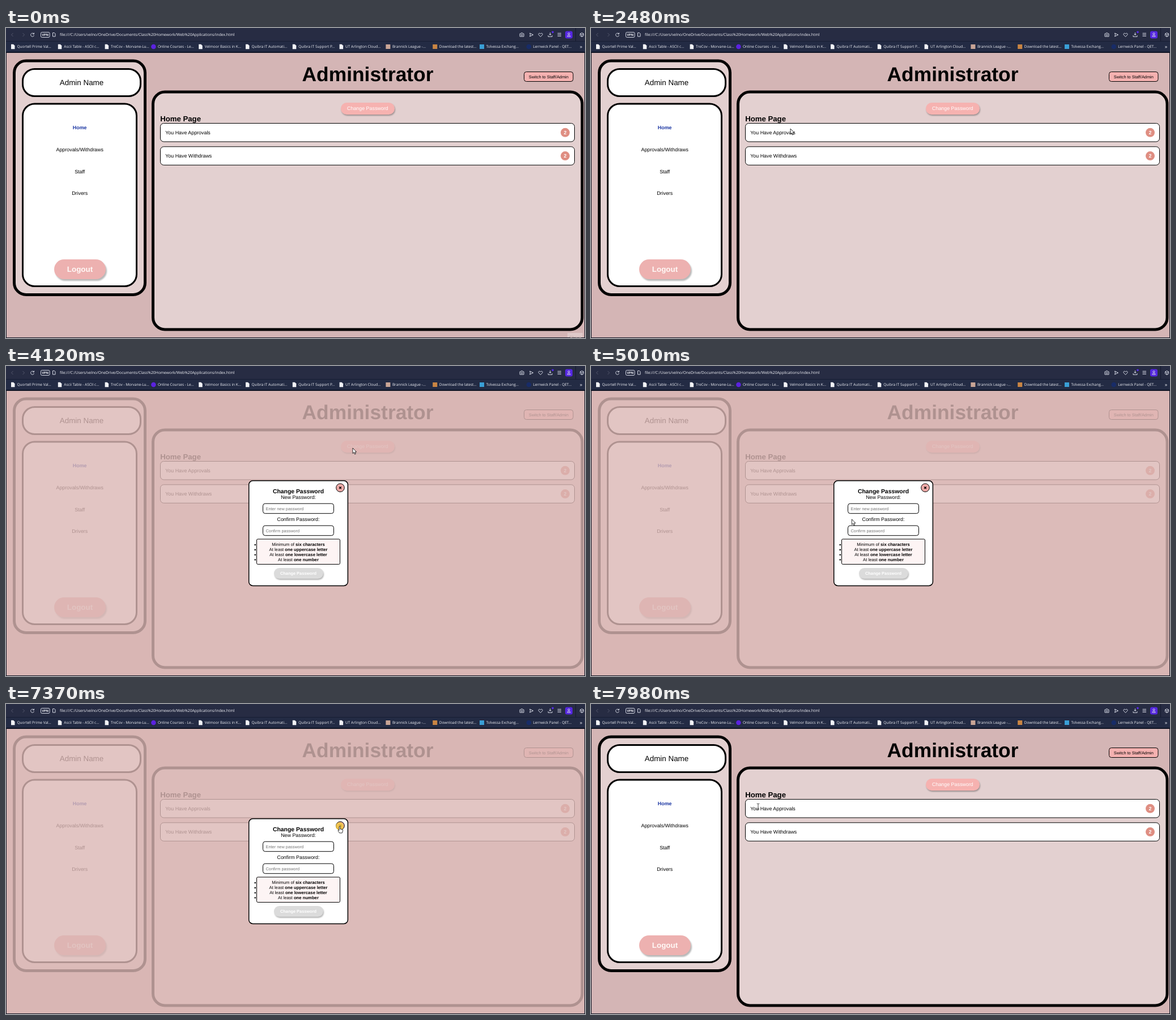
Animation of 1022 by 548 pixels, one loop 8000 ms. Source, as an HTML page:

```html
<!DOCTYPE html>
<html lang="en">
<head>
<meta charset="utf-8">
<title>Administrator</title>
<style>
  html, body { margin: 0; width: 100%; height: 100%; overflow: hidden; background: #0d1222; }
  svg { display: block; width: 1022px; height: 548px; }
  text { font-family: "Liberation Sans", Arial, sans-serif; font-size: 8.9px; text-rendering: geometricPrecision; }
  .mid { text-anchor: middle; }
  .bold { font-weight: 700; }
  .white { fill: #fff; }
  .ui text { font-family: "Open Sans", "Noto Sans", sans-serif; font-size: 6.5px; fill: #f2f3f8; }
  .line { fill: none; stroke: #d5d8e4; stroke-width: 1; }
  .card { fill: #fff; stroke: #000; stroke-width: 1; }
  .small { font-size: 7.4px; }
  .rules { font-size: 7.7px; }
  .lift { filter: drop-shadow(1px 2px 1.2px rgba(0, 0, 0, .3)); }
</style>
</head>
<body>
<svg viewBox="0 0 1022 548">
  <!-- browser bars -->
  <g class="ui">
    <rect width="1022" height="24" fill="#272c43"/>
    <rect y="24" width="1022" height="18" fill="#232b44"/>
    <rect y="23" width="1022" height="1" fill="#171d33"/>
    <rect x="1005" width="1" height="23" fill="#141a2e"/>
    <path class="line" stroke-opacity=".25" d="M12.5 9l-3 3 3 3M29.500 9l3 3-3 3"/>
    <path class="line" d="M49 10.300A3 3 0 1 0 49.500 13M49.500 8.500v2.300h-2.300"/>
    <rect class="line" x="61.500" y="7.500" width="15.500" height="9" rx="2"/>
    <text class="mid bold" x="69.300" y="14.200" style="font-size:5.600px">VPN</text>
    <path class="line" d="M82.500 8.500h3l1.500 1.500v5h-4.500z"/>
    <text x="95" y="14.300" style="font-size:6.800px">file:///C:/Users/velno/OneDrive/Documents/Class%20Homework/Web%20Applications/index.html</text>
    <path class="line" d="M907 10h1.500l1-1.300h2l1 1.300h1.500v5h-7z"/>
    <circle class="line" cx="910.500" cy="12.300" r="1.400"/>
    <path class="line" d="M924.500 9l6 3-6 3 1-3z"/>
    <path class="line" d="M943.500 15.500l-3.200-3.300c-1.500-2.600 2-4.200 3.200-1.700 1.200-2.500 4.700-.9 3.200 1.700z"/>
    <path class="line" d="M960.500 8v4.500m-2-1.800l2 2 2-2M957 13v2.300h7V13M973.500 9.300h6.500M973.500 11.800h6.500M973.500 14.300h6.500"/>
    <circle cx="965" cy="7.300" r="1.800" fill="#5a2cf0"/>
    <rect x="987" y="5.500" width="13" height="13" rx="3" fill="#5527e0"/>
    <circle class="line" cx="993.500" cy="10.200" r="1.600"/>
    <path class="line" d="M990.800 15c0-3 5.400-3 5.400 0z"/>
    <path class="line" d="M1016.500 8.500l3 1.700v3.600l-3 1.700-3-1.700v-3.600zM1013.500 10.200l3 1.700 3-1.700M1016.500 12v3.500"/>
    <g id="marks"></g>
    <text class="mid" x="1015" y="35.500" style="font-size:9px">»</text>
  </g>

  <!-- page -->
  <rect x="1" y="44" width="1020" height="503" fill="#d4b5b5"/>
  <g fill="#e3d0d0" stroke="#000" stroke-width="5">
    <rect x="14.500" y="58" width="231" height="413.500" rx="21"/>
    <rect x="259.500" y="113" width="757.500" height="420" rx="21"/>
  </g>
  <g fill="#fff" stroke="#000" stroke-width="3">
    <rect x="29.500" y="72.500" width="208" height="48" rx="21"/>
    <rect x="29.500" y="134" width="201" height="322.500" rx="21"/>
  </g>
  <text class="mid" x="133.500" y="101.200" style="font-size:13.400px">Admin Name</text>
  <text class="mid bold" x="130.200" y="179.200" fill="#1a35a2">Home</text>
  <text class="mid" x="130.200" y="217.900">Approvals/Withdraws</text>
  <text class="mid" x="130.200" y="256.600">Staff</text>
  <text class="mid" x="130.200" y="295.300">Drivers</text>
  <rect x="85" y="409" width="91" height="35" rx="17.500" fill="#edb1b0" style="filter:drop-shadow(2px 3px 1px rgba(0,0,0,.28))"/>
  <text class="mid bold" x="130.500" y="431" fill="#fff9f6" style="font-size:13.400px">Logout</text>
  <text class="mid bold" x="638.500" y="93.700" style="font-size:35.400px">Administrator</text>
  <rect class="card" x="914.500" y="77.500" width="86.500" height="17" rx="4" style="fill:#f5b1b0"/>
  <text class="mid small" x="957.800" y="88.600">Switch to Staff/Admin</text>
  <rect id="change" class="lift" x="591" y="132" width="95" height="21" rx="10.500"/>
  <text class="mid white" x="638.300" y="145.300">Change Password</text>
  <text class="bold" x="272.200" y="165" style="font-size:13.200px">Home Page</text>
  <g id="cards"></g>
  <g id="tip">
    <rect x="991" y="539" width="27" height="8" fill="#dfc9c9"/>
    <text x="994" y="550" fill="#b9a3a3" style="font-size:8px">Share</text>
  </g>

  <!-- dialog -->
  <g id="dialog">
    <rect x="1" y="44" width="1020" height="503" fill="rgba(219,183,180,.8)"/>
    <rect x="428.700" y="202.800" width="174.700" height="185.600" rx="7" fill="#fff" stroke="#000" stroke-width="1.500"/>
    <text class="mid bold" x="516" y="224.500" style="font-size:10.400px">Change Password</text>
    <text class="mid" x="516" y="235">New Password:</text>
    <text class="mid" x="516" y="274.300">Confirm Password:</text>
    <rect class="card" x="453.500" y="243.200" width="125" height="17.500" rx="4"/>
    <rect class="card" x="453.500" y="282.200" width="125" height="17.500" rx="4"/>
    <text class="small" x="458.500" y="254.600" fill="#757575">Enter new password</text>
    <text class="small" x="458.500" y="293.600" fill="#757575">Confirm password</text>
    <rect class="card" x="442.500" y="306" width="147" height="44.500" rx="2" style="fill:#fdf4f4"/>
    <g id="rules"></g>
    <rect class="lift" x="473" y="357" width="87" height="19" rx="9.500" fill="#dbdbdb"/>
    <text class="mid bold small white" x="516" y="369.100">Change Password</text>
    <circle cx="590" cy="215.200" r="7.300" fill="#eeaaa7" stroke="#000"/>
    <path d="M588.200 213.400l3.600 3.600m0-3.600l-3.600 3.600" stroke="#000" stroke-width="1.400"/>
  </g>

  <!-- pointer -->
  <g id="pointer">
    <circle id="click" r="7" fill="#f2cb3a" fill-opacity=".78"/>
    <path id="arrow" d="M0 0V9.500L2.200 7.500 3.700 11 5.300 10.300 3.800 7H6.700Z" fill="#fff" stroke="#000" stroke-width=".8"/>
    <path id="beam" d="M-2.300-5Q0-5 0-4Q0-5 2.300-5M0-4V4M-2.300 5Q0 5 0 4Q0 5 2.300 5" fill="none" stroke="#333" stroke-width=".9"/>
    <path id="hand" d="M-1 7.500V1.500Q-1 .3 0 .3T1 1.500V5L4.500 5.700Q5.700 6 5.600 7.200L5 10.200 4.300 12H-.3L-2.800 8.300Q-3.300 7-2.200 6.800Z" fill="#fff" stroke="#000" stroke-width=".8"/>
  </g>
</svg>
<script>
const $ = id => document.getElementById(id);
const fill = (id, list, draw) => { $(id).innerHTML = list.map(draw).join(''); };

const page = x => `<path d="M${x - 3} 28.800h4l2.500 2.500v6h-6.500z" fill="#f1f2f6"/>`;
const square = c => x => `<rect x="${x - 4}" y="29" width="8" height="8" fill="${c}"/>`;
const disc = c => x => `<circle cx="${x}" cy="33" r="4.300" fill="${c}"/>`;
fill('marks', [
  ['Quortell Prime Val...', page],
  ['Ascii Table - ASCII c...', page],
  ['TreCov - Morvane-Lu...', page],
  ['Online Courses - Le...', disc('#5b22e0')],
  ['Velmoor Basics in K...', page],
  ['Quibra IT Automati...', page],
  ['Quibra IT Support P...', page],
  ['UT Arlington Cloud...', page],
  ['Brannick League -...', square('#c9a596')],
  ['Download the latest...', square('#c98543')],
  ['Tolvessa Exchang...', square('#399fd6')],
  ['Lernwick Panel - QET...', disc('#182c68')]
], ([name, icon], i) => {
  const x = 19.500 + i * 82.800;
  return icon(x - 7.500) + `<text x="${x}" y="35.300">${name}</text>`;
});

fill('cards', ['Approvals', 'Withdraws'], (name, i) => {
  const y = 168.500 + i * 41.300;
  return `<rect class="card" x="272.500" y="${y}" width="731" height="32.500" rx="6"/>
    <text x="281.200" y="${y + 19.200}">You Have ${name}</text>
    <circle cx="987" cy="${y + 16.300}" r="8" fill="#df8e82"/>
    <text class="mid bold white" x="987" y="${y + 19.500}">2</text>`;
});

fill('rules', [
  ['Minimum of', 'six characters'],
  ['At least', 'one uppercase letter'],
  ['At least', 'one lowercase letter'],
  ['At least', 'one number']
], ([lead, rule], i) => {
  const y = 318.100 + i * 8.800;
  return `<circle cx="439.800" cy="${y - 2}" r="1.300"/>
    <text class="mid rules" x="516" y="${y}">${lead} <tspan class="bold">${rule}</tspan></text>`;
});

// start, end, steps, evenly timed points
const moves = [
  [520, 1270, 12, '990,560 966,530 900,466 800,382 705,317 645,283 625,271'],
  [1330, 1400, 2, '625,271 623,269 621,267'],
  [1930, 2680, 12, '621,267 616,265 590,256 545,241 480,219 410,196 352,178 306,179 316,182'],
  [2880, 3650, 12, '316,182 325,184 380,180 455,171 530,159 590,149 612,145'],
  [4190, 4810, 10, '612,145 603,157 570,186 520,217 478,235 465,240'],
  [4880, 5630, 12, '465,240 460,265 462,300 476,323 505,312 540,270 563,238 573,228'],
  [5700, 5980, 5, '573,228 576,226 584,220 588,217 589,216'],
  [7640, 7980, 6, '589,216 560,212 480,202 390,190 320,183 295,181']
].map(([from, to, steps, path]) =>
  ({ from, to, steps, path: path.split(' ').map(p => p.split(',').map(Number)) }));

function place(t) {
  const m = moves.filter(m => t >= m.from).pop();
  if (!m) return null;
  const step = Math.floor((t - m.from) / (m.to - m.from) * (m.steps - 1) + .01) + 1;
  const u = Math.min(step / m.steps, 1) * (m.path.length - 1);
  const i = Math.min(Math.floor(u), m.path.length - 2);
  const [a, b] = [m.path[i], m.path[i + 1]];
  return a.map((v, k) => v + (b[k] - v) * (u - i));
}

const inside = ([x, y], l, t, r, b) => x >= l && x <= r && y >= t && y <= b;
const show = (id, on) => { $(id).style.display = on ? '' : 'none'; };

function shape(p, open) {
  if (open) {
    if (Math.hypot(p[0] - 590, p[1] - 215) < 8) return 'hand';
    return inside(p, 453, 243, 579, 261) || inside(p, 453, 282, 579, 300) ? 'beam' : 'arrow';
  }
  return inside(p, 281, 178.500, 361, 191) ? 'beam' : 'arrow';
}

function draw(now) {
  const t = now % 8000;
  const open = t >= 4120 && t < 7500;
  const p = place(t);
  show('tip', t < 70);
  show('dialog', open);
  show('pointer', p);
  const hover = p && !open && inside(p, 591, 132, 686, 153);
  $('change').setAttribute('fill', hover ? '#e28a85' : '#f6b2b0');
  if (p) {
    const kind = shape(p, open);
    for (const id of ['arrow', 'beam', 'hand']) show(id, id === kind);
    show('click', (t >= 4050 && t < 4120) || (t >= 7370 && t < 7500));
    $('pointer').setAttribute('transform', `translate(${p})`);
  }
}

const start = performance.now();
(function tick() {
  draw(performance.now() - start);
  requestAnimationFrame(tick);
})();
</script>
</body>
</html>
```
